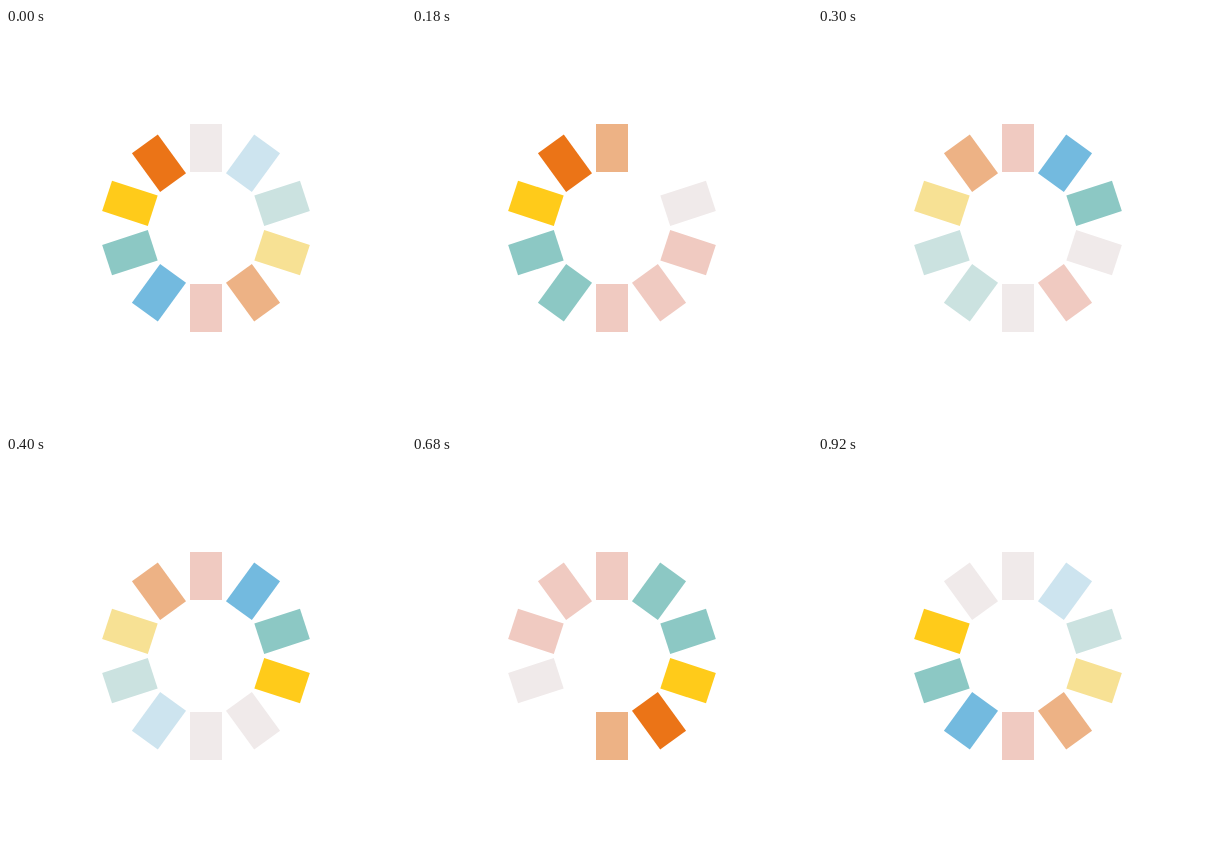
An HTML page for the animation above (1000 ms loop, 400x400 px).

```html
<!DOCTYPE html>
<html>
<head>
<meta charset="utf-8">
<style>
html, body { margin: 0; width: 100%; height: 100%; overflow: hidden; background: #fff; }
svg { display: block; width: 100%; height: 100%; }
</style>
</head>
<body>
<svg viewBox="0 0 400 400"></svg>
<script>
const BARS = 10, STEPS = 40, LOOP = 1000;
const white = '#ffffff', grey = '#f0eaea', pink = '#f0cac1', peach = '#edb285',
  orange = '#eb7417', yellow = '#ffcb1a', paleYellow = '#f7e194',
  teal = '#8cc8c4', paleTeal = '#cbe2e0', blue = '#73badf', paleBlue = '#cde4ef';

// Each fade lists [age at which the colour begins, colour]; five fades repeat around the ring.
const fades = [
  [[0, peach], [5, pink], [26, grey]],
  [[0, blue], [18, teal], [24, paleTeal], [27, paleBlue], [33, grey], [39, white]],
  [[0, teal], [17, paleTeal], [32, paleBlue], [33, grey], [37, white]],
  [[0, yellow], [13, peach], [15, paleYellow], [31, pink], [34, grey]],
  [[0, orange], [9, peach], [27, pink], [34, grey]]
];

const svg = document.querySelector('svg');
const bars = Array.from({ length: BARS }, (_, i) => {
  const bar = document.createElementNS(svg.namespaceURI, 'rect');
  const attrs = { x: 184, y: 96, width: 32, height: 48, transform: `rotate(${i * 360 / BARS} 200 200)` };
  for (const name in attrs) bar.setAttribute(name, attrs[name]);
  return svg.appendChild(bar);
});

function draw(time) {
  const step = Math.floor(time % LOOP / LOOP * STEPS);
  bars.forEach((bar, i) => {
    const age = (step + (BARS - 1 - i) * STEPS / BARS) % STEPS;
    const [, colour] = fades[i % fades.length].findLast(([start]) => start <= age);
    bar.setAttribute('fill', colour);
  });
}

let begin;
function tick(now) {
  begin ??= now;
  draw(now - begin);
  requestAnimationFrame(tick);
}
draw(0);
requestAnimationFrame(tick);
</script>
</body>
</html>
```
